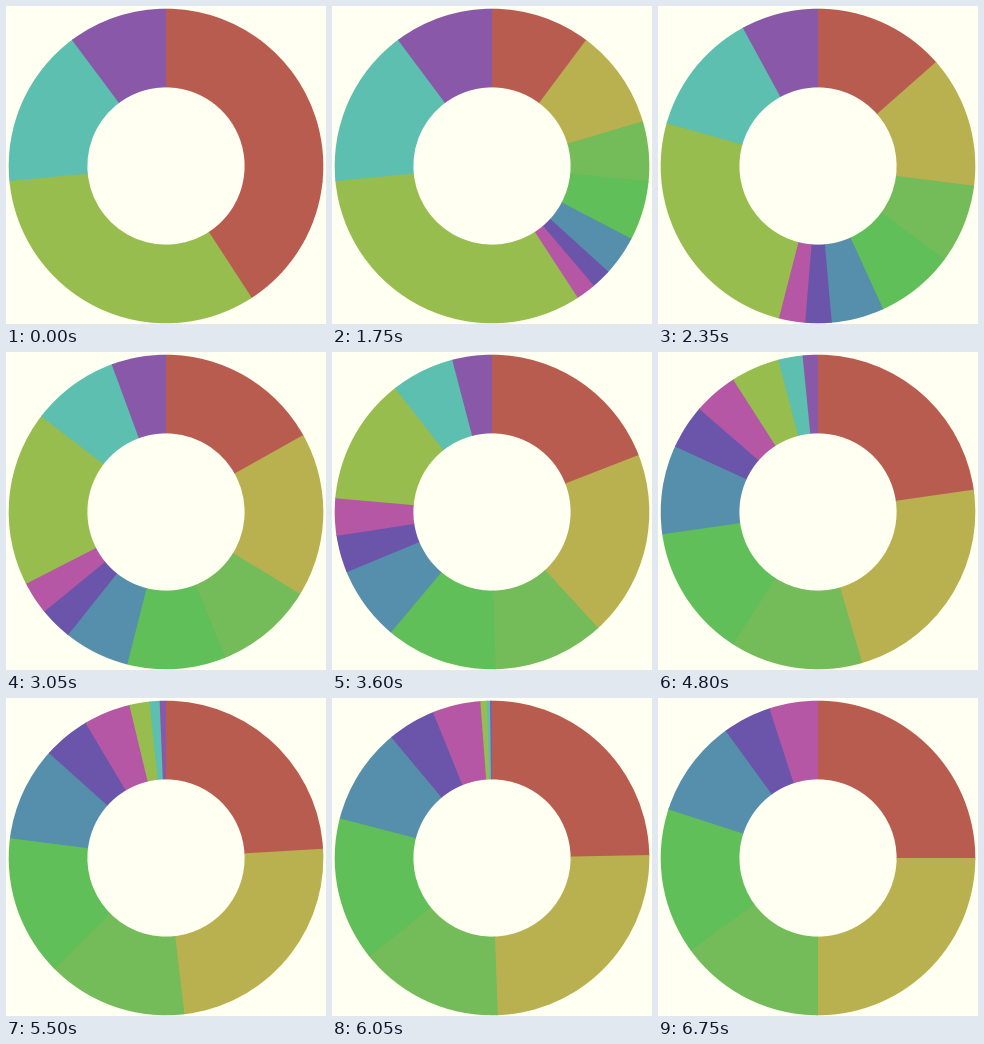
A matplotlib script for the animation above (7.15 s loop, 320 by 318 pixels).

```python
import matplotlib.pyplot as plt
from matplotlib.animation import FuncAnimation
from matplotlib.patches import Wedge
import numpy as np

WIDTH, HEIGHT, DPI = 320, 318, 100
STEP_MS, FRAMES = 50, 143
SPLIT_MS, ZOOM_START_MS, ZOOM_MS = 1750, 1758, 5000
CENTER, OUTER, INNER = (160, 160), 157.3, 78.6
OVERLAP = 0.5

# The first group splits into children that grow to fill the ring.
GROUPS = np.array([20, 16, 8, 5]) / 49
CHILDREN = np.array([25, 25, 15, 15, 10, 5, 5]) / 100
CHILD_COLORS = ["#b95c50", "#b9b150", "#74bb5a", "#60bf58",
                "#568fab", "#6a55aa", "#b557a5"]
OTHER_COLORS = ["#97bd4e", "#5cbfb0", "#8a58a8"]
COLORS = CHILD_COLORS + OTHER_COLORS

fig = plt.figure(figsize=(WIDTH / DPI, HEIGHT / DPI), dpi=DPI,
                 facecolor="#fffff2")
ax = fig.add_axes([0, 0, 1, 1])
ax.set_xlim(0, WIDTH)
ax.set_ylim(HEIGHT, 0)
ax.axis("off")


def ease_out(u):
    return 1 - (1 - u) ** 2


def make_slice(color):
    wedge = Wedge(CENTER, OUTER, -90, 270, width=OUTER - INNER,
                  facecolor=color, linewidth=0)
    return ax.add_patch(wedge)


slices = [make_slice(color) for color in COLORS]


def update(frame):
    now = frame * STEP_MS
    progress = ease_out(np.clip((now - ZOOM_START_MS) / ZOOM_MS, 0, 1))
    group = GROUPS[0] + (1 - GROUPS[0]) * progress
    shares = np.concatenate([CHILDREN * group, GROUPS[1:] * (1 - progress)])
    ends = 360 * np.cumsum(shares)

    # The y axis points down, so angles run clockwise from -90 at the top.
    # Each slice reaches a little under the next one to avoid seams.
    for i, (wedge, end, share) in enumerate(zip(slices, ends, shares)):
        wedge.set_theta1(-90 + end - 360 * share)
        wedge.set_theta2(-90 + min(end + OVERLAP, 360))
        wedge.set_visible(share > 1e-6)
        if i < len(CHILDREN):
            wedge.set_facecolor(CHILD_COLORS[i if now >= SPLIT_MS else 0])
    return slices


anim = FuncAnimation(fig, update, frames=FRAMES, interval=STEP_MS,
                     repeat=True, repeat_delay=0, blit=False)
plt.show()
```
